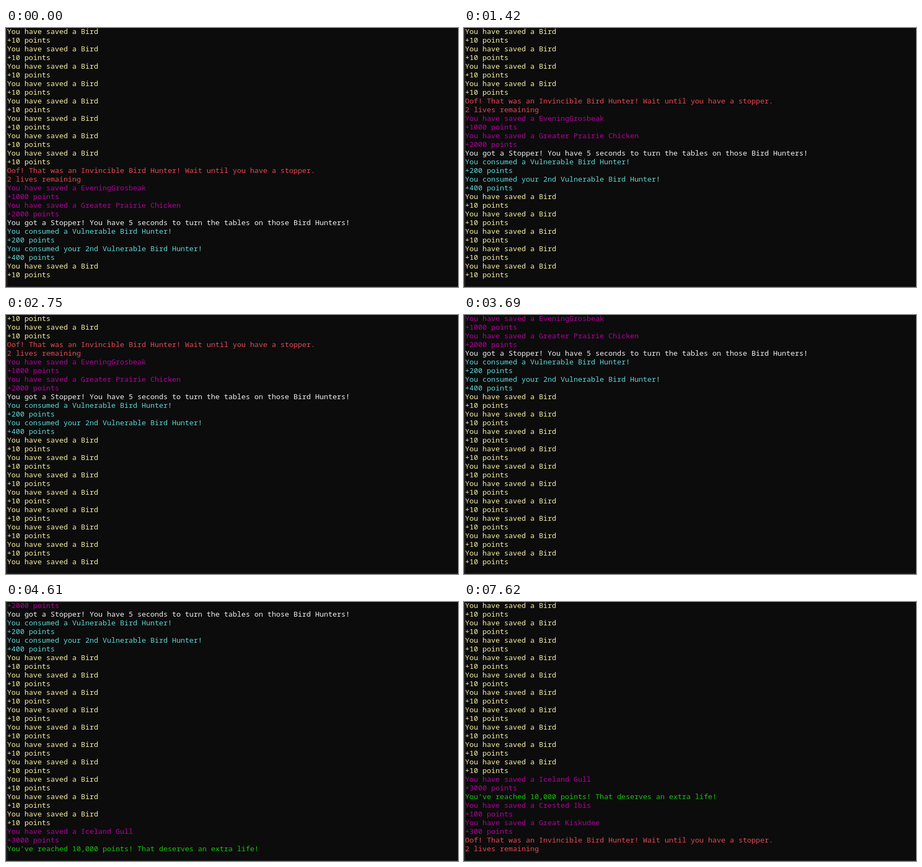
Animation, 833 px wide and 477 px high, one loop 8400 ms. Source, as an HTML page:

```html
<!DOCTYPE html>
<html lang="en">
<head>
<meta charset="utf-8">
<title>Bird game log</title>
<style>
  html, body {
    margin: 0;
    width: 100%;
    height: 100%;
    overflow: hidden;
    background: #0c0c0c;
  }
  svg { display: block; }
  text {
    font: 13.3333px "Noto Sans Mono", "DejaVu Sans Mono", monospace;
    white-space: pre;
  }
  .bird { fill: #f9f1a5; }
  .hurt { fill: #e74856; }
  .rare { fill: #b4009e; }
  .stop { fill: #f2f2f2; }
  .hunt { fill: #61d6d6; }
  .life { fill: #16c60c; }
</style>
</head>
<body>
<svg width="833" height="477" viewBox="0 0 833 477">
  <rect width="833" height="477" fill="#0c0c0c"/>
  <rect x="1" width="1" height="477" fill="#3a3a3a"/>
  <rect y="476" width="833" height="1" fill="#2a2a2a"/>
  <svg width="833" height="463"><g id="log"></g></svg>
</svg>
<script>
const LOOP = 8400, ROW = 16, BASE = 11;

const saved = (kind, name, points) => [
  [kind, `You have saved a ${name}`],
  [kind, `+${points} points`]
];
const birds = n => Array.from({ length: n }, () => saved('bird', 'Bird', 10)).flat();
const oof = [
  ['hurt', 'Oof! That was an Invincible Bird Hunter! Wait until you have a stopper.'],
  ['hurt', '2 lives remaining']
];

const lines = [
  ...birds(8),
  ...oof,
  ...saved('rare', 'EveningGrosbeak', 1000),
  ...saved('rare', 'Greater Prairie Chicken', 2000),
  ['stop', 'You got a Stopper! You have 5 seconds to turn the tables on those Bird Hunters!'],
  ['hunt', 'You consumed a Vulnerable Bird Hunter!'],
  ['hunt', '+200 points'],
  ['hunt', 'You consumed your 2nd Vulnerable Bird Hunter!'],
  ['hunt', '+400 points'],
  ...birds(10),
  ...saved('rare', 'Iceland Gull', 3000),
  ['life', "You've reached 10,000 points! That deserves an extra life!"],
  ...saved('rare', 'Crested Ibis', 100),
  ...saved('rare', 'Great Kiskudee', 300),
  ...oof
];

// [time in ms, rows scrolled off the top]
const steps = [
  [0, 0], [70, 2], [530, 4], [960, 5], [1010, 6], [1420, 8], [1880, 10],
  [2340, 12], [2750, 13], [2800, 14], [3230, 16], [3690, 18], [4100, 19],
  [4150, 20], [4610, 21], [6600, 23], [7110, 25], [7570, 26], [7620, 27],
  [LOOP, 27]
];

const log = document.getElementById('log');
lines.forEach(([kind, str], i) => {
  const el = document.createElementNS(log.namespaceURI, 'text');
  el.setAttribute('class', kind);
  el.setAttribute('x', 2);
  el.setAttribute('y', BASE + i * ROW);
  el.textContent = str;
  log.append(el);
});

log.animate(
  steps.map(([time, rows]) => ({
    offset: time / LOOP,
    transform: `translateY(${-rows * ROW}px)`,
    easing: 'step-end'
  })),
  { duration: LOOP, iterations: Infinity }
);
</script>
</body>
</html>
```
